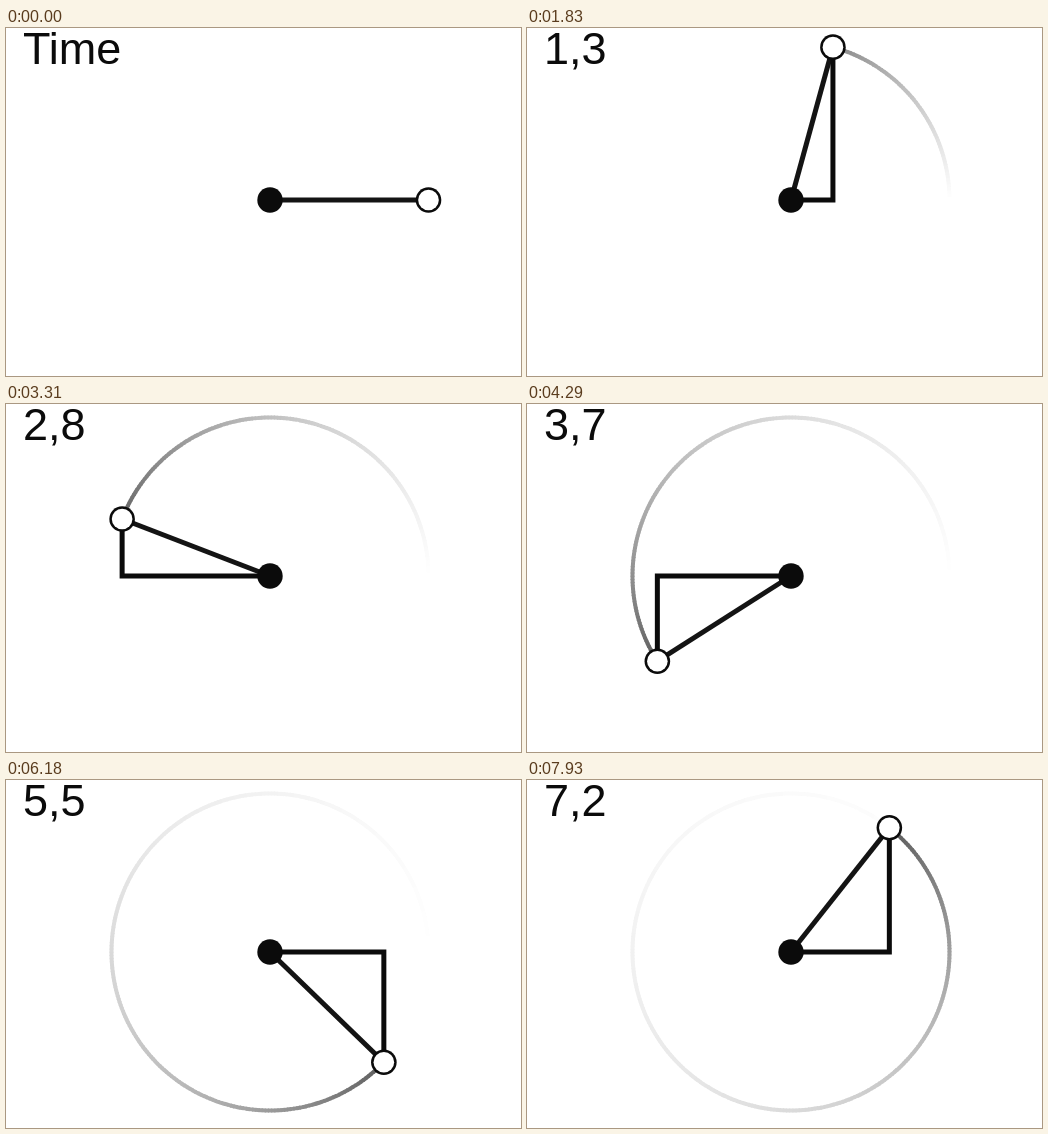
An HTML page with a canvas that plays this animation: 515 px wide and 348 px high, repeating every 8000 ms.

```html
<!DOCTYPE html>
<html lang="en">
<head>
<meta charset="utf-8">
<title>Rotating radius</title>
<style>
html, body { margin: 0; width: 100%; height: 100%; overflow: hidden; background: #fff; }
canvas, svg { position: absolute; left: 0; top: 0; }
text { font: 45px "Liberation Sans", Arial, sans-serif; fill: #0b0b0b; }
</style>
</head>
<body>
<canvas width="515" height="348"></canvas>
<svg width="515" height="348"><text id="label" x="17" y="36">Time</text></svg>
<script>
const LOOP = 8000, HOLD = 500, STEP = 70;
const CX = 264, CY = 172, RADIUS = 158.5, INK = '#0b0b0b';
const ctx = document.querySelector('canvas').getContext('2d');
const label = document.getElementById('label');

// Steps last 70 ms, apart from a few 10 ms timing corrections.
const stepStart = k => HOLD + STEP * k + ((k >= 18 && k < 90) || k >= 101 ? 10 : 0);

function angleAt(t) {
  if (t < HOLD) return 0;
  let k = Math.floor((t - HOLD) / STEP);
  if (stepStart(k) > t) k--;
  return 0.692 + (stepStart(k) - 1130) * 0.0009548;
}

function stroke(points, width, color) {
  ctx.beginPath();
  points.forEach(p => ctx.lineTo(...p));
  ctx.lineWidth = width;
  ctx.strokeStyle = color;
  ctx.stroke();
}

function disc(x, y, r, color) {
  ctx.beginPath();
  ctx.arc(x, y, r, 0, 2 * Math.PI);
  ctx.fillStyle = color;
  ctx.fill();
}

function drawTrail(angle) {
  const d = 0.02;
  ctx.lineWidth = 4;
  for (let a = Math.max(0, angle - 2 * Math.PI); a < angle; a += d) {
    const ink = 0.65 * Math.exp((a - angle) / 1.65) * (1 - Math.exp(-a));
    const grey = Math.round(255 * (1 - ink));
    ctx.strokeStyle = `rgb(${grey},${grey},${grey})`;
    ctx.beginPath();
    ctx.arc(CX, CY, RADIUS, -a, -Math.min(angle, a + d * 1.3), true);
    ctx.stroke();
  }
}

function draw(t) {
  const angle = angleAt(t);
  const x = CX + RADIUS * Math.cos(angle);
  const y = CY - RADIUS * Math.sin(angle);
  ctx.clearRect(0, 0, 515, 348);
  drawTrail(angle);
  stroke([[CX, CY], [x, y]], 5, '#141414');
  if (angle) stroke([[CX, CY], [x, CY], [x, y]], 5, INK);
  disc(CX, CY, 12.7, INK);
  disc(x, y, 12.8, INK);
  disc(x, y, 10.3, '#fff');
  label.textContent = angle ? angle.toFixed(1).replace('.', ',') : 'Time';
}

const begin = performance.now();
function tick() {
  draw((performance.now() - begin) % LOOP);
  requestAnimationFrame(tick);
}
tick();
</script>
</body>
</html>
```
